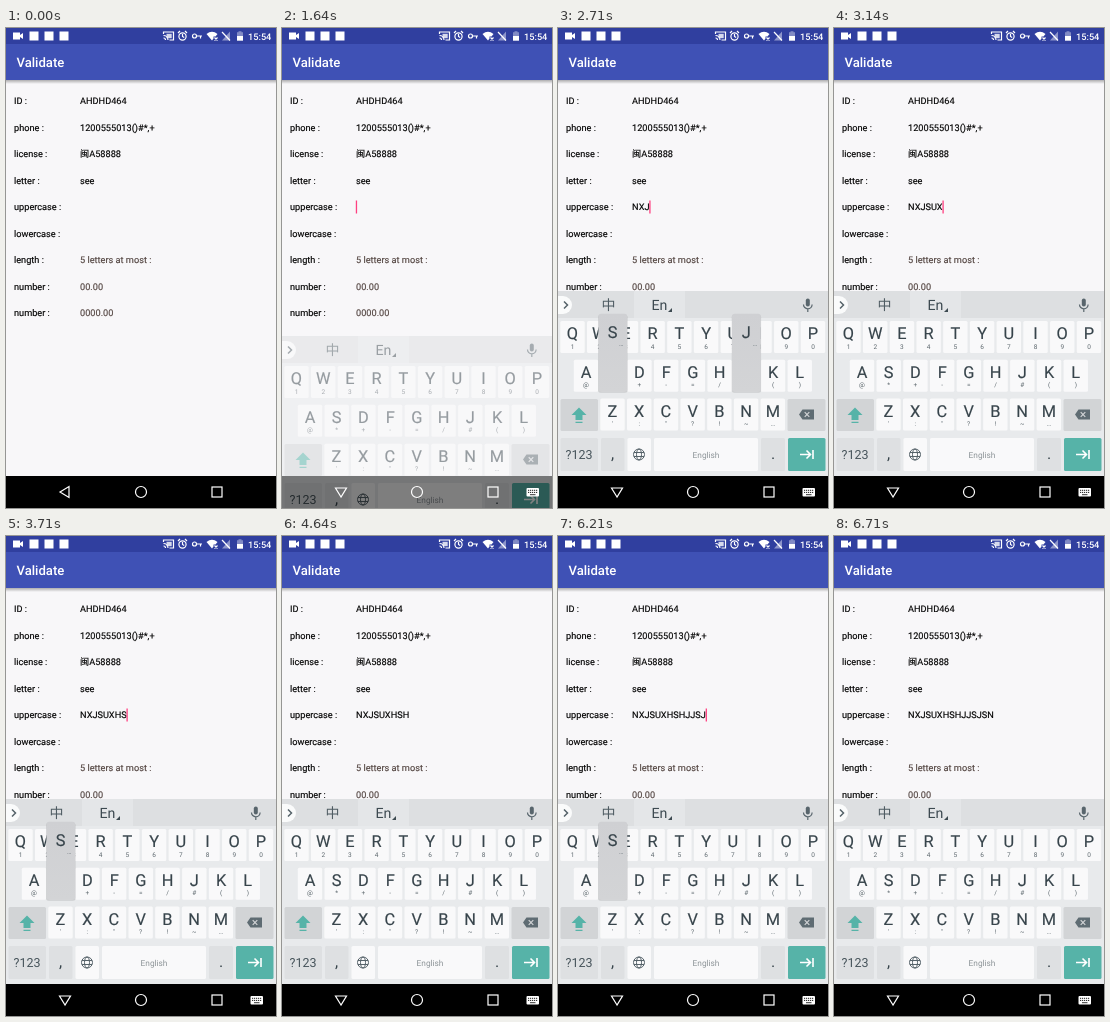
Write an HTML page that moves like this. It is 270 px wide and 480 px high and loops after 7 s.

```html
<!DOCTYPE html>
<html lang="en">
<head>
<meta charset="utf-8">
<title>Validate</title>
<style>
  html, body { margin: 0; width: 100%; height: 100%; overflow: hidden; background: #f8f7f9; }
  svg { display: block; width: 270px; height: 480px; font-family: Roboto, "Noto Sans CJK SC", "Noto Sans CJK JP", "Noto Sans CJK", sans-serif; text-rendering: geometricPrecision; }
  text { white-space: pre; }
  .form { font-size: 9.2px; fill: #000; stroke: #000; stroke-width: .15; }
  .form .hint { fill: #51433f; stroke: #51433f; }
  .line { fill: none; stroke: #fff; stroke-width: 1.2; }
  .key { fill: #f9f9fa; }
  .fn { fill: #dee0e2; }
  .dark { fill: #d2d4d6; }
  .cap { font-size: 16.4px; fill: #37444b; stroke: #37444b; stroke-width: .15; text-anchor: middle; }
  .sub { font-size: 6.5px; fill: #5d686e; text-anchor: middle; }
</style>
</head>
<body>
<svg viewBox="0 0 270 480">
  <defs>
    <linearGradient id="shade" x2="0" y2="1">
      <stop offset="0" stop-color="#000" stop-opacity=".3"/>
      <stop offset="1" stop-color="#000" stop-opacity="0"/>
    </linearGradient>
    <linearGradient id="pop" x2="0" y2="1">
      <stop offset="0" stop-color="#cfd0d3"/>
      <stop offset="1" stop-color="#d3d4d6"/>
    </linearGradient>
  </defs>

  <rect width="270" height="480" fill="#f8f7f9"/>
  <rect y="52" width="270" height="4" fill="url(#shade)"/>
  <rect width="270" height="52" fill="#3f51b5"/>
  <rect width="270" height="16" fill="#303f9f"/>
  <text x="10.5" y="39" font-size="13.1" font-weight="500" fill="#fff">Validate</text>

  <g id="status" fill="#fff">
    <path d="M7 4.500h7v2.500l3-2v6l-3-2v2.500h-7z"/>
    <rect x="23.500" y="3.500" width="9" height="9"/>
    <rect x="38.500" y="3.500" width="9" height="9"/>
    <rect x="53.500" y="3.500" width="9" height="9"/>
    <path class="line" d="M157.500 6V4h10v8h-4M157.500 7.500a4.500 4.500 0 0 1 4.500 4.500M157.500 10a2 2 0 0 1 2 2"/>
    <rect x="160.500" y="5.800" width="5.200" height="4.400" opacity=".8"/>
    <g class="line"><circle cx="176.500" cy="8.500" r="3.600"/><path d="M176.500 6v2.500l1.700 1M172 5l2-2M181 5l-2-2"/></g>
    <g class="line"><circle cx="188.500" cy="8" r="2"/><path d="M190.500 8h5.500M194.500 8v2.500"/></g>
    <path d="M200.500 6q5.500-4.500 11 0l-2 2.500h-2v2l-1.500 2z"/>
    <path class="line" d="M208.500 9.500l3 3m0-3l-3 3"/>
    <path d="M216 12.500l8-9v9z" opacity=".45"/>
    <path class="line" d="M216 4l8 8.500"/>
    <path d="M231 4.200h1.500v-1h3v1H237v3.800h-6z" opacity=".4"/>
    <path d="M231 8h6v4.700h-6z"/>
    <text x="242" y="11.800" font-size="9.2" font-weight="500">15:54</text>
  </g>

  <g id="form" class="form"></g>
  <rect id="cursor" y="172.500" width="1.300" height="13" fill="#ff4081"/>

  <rect y="448" width="270" height="32" fill="#000"/>
  <g id="keyboard">
    <rect y="263" width="270" height="185" fill="#e8eaec"/>
    <rect y="263" width="270" height="27" fill="#dddfe1"/>
    <rect x="76" y="263" width="51" height="27" fill="#e4e6e8"/>
    <path d="M0 268h5a9 9 0 0 1 0 18H0z" fill="#fafbfb"/>
    <path d="M6 273.500l3.500 3.500l-3.500 3.500" fill="none" stroke="#56636a" stroke-width="1.500"/>
    <text x="43.500" y="282" font-size="14" fill="#4f5c63">中</text>
    <text x="93.500" y="282" font-size="14.200" fill="#3d4a51">En</text>
    <path d="M114 280v4h-4z" fill="#3d4a51"/>
    <rect x="247.800" y="270.500" width="4" height="8" rx="2" fill="#58656c"/>
    <path d="M245.500 276.500a4.300 4.300 0 0 0 8.600 0M249.800 281v3" fill="none" stroke="#58656c" stroke-width="1.200"/>
    <g id="keys"></g>
    <path d="M21 379.500l7.500 7.500h-4v5h-7v-5h-4zM17.500 393.700h7v1.200h-7z" fill="#56b3a8"/>
    <path d="M244.500 381.500h11.500v10h-11.500l-3.500-5z" fill="#5f6c73"/>
    <path d="M246.700 384.200l4.600 4.600m0-4.600l-4.600 4.600" stroke="#d2d4d6" stroke-width="1.200"/>
    <g fill="none" stroke="#56636a">
      <circle cx="81" cy="426.500" r="5.500"/>
      <ellipse cx="81" cy="426.500" rx="2.500" ry="5.500"/>
      <path d="M76 424.500h10M76 428.500h10"/>
    </g>
    <path d="M242 426.500h10M248.500 422.500l4 4l-4 4M255 422v9" fill="none" stroke="#fff" stroke-width="1.600"/>
  </g>
  <g id="popups"></g>

  <g class="line">
    <path id="back" d="M54 464l9-5.500v11z"/>
    <circle cx="135" cy="464" r="5.500"/>
    <rect x="206" y="459" width="10" height="10"/>
  </g>
  <g id="imeIcon" fill="#fff">
    <rect x="244.500" y="460" width="12.500" height="8.500" rx="1"/>
    <path d="M246 462.300h9.500M246 464.400h9.500" stroke="#000" stroke-width=".9" stroke-dasharray="1.200 .8"/>
    <path d="M248 466.700h5.500" stroke="#000" stroke-width=".8"/>
  </g>
</svg>
<script>
const LOOP = 7000;
const $ = id => document.getElementById(id);

function add(parent, tag, attrs, text) {
  const el = document.createElementNS('http://www.w3.org/2000/svg', tag);
  for (const name in attrs) el.setAttribute(name, attrs[name]);
  if (text) el.textContent = text;
  return parent.appendChild(el);
}

// Form rows: label, value, is the value a hint
const rows = [
  ['ID :', 'AHDHD464'], ['phone :', '1200555013()#*,+'], ['license :', '闽A58888'],
  ['letter :', 'see'], ['uppercase :', ''], ['lowercase :', ''],
  ['length :', '5 letters at most :', true], ['number :', '00.00', true], ['number :', '0000.00', true]
];
const values = rows.map(([label, value, hint], i) => {
  const y = 76.1 + i * 26.5;
  add($('form'), 'text', { x: 8, y }, label);
  return add($('form'), 'text', { x: 74, y, class: hint ? 'hint' : '' }, value);
});
const field = values[4];

// Keyboard
const keys = $('keys');
const spots = {};
function keyBox(x, y, width, height, cls) {
  return add(keys, 'rect', { x, y, width, height, rx: 1.5, class: cls });
}
[
  ['QWERTYUIOP', '1234567890', 14.5],
  ['ASDFGHJKL', '@*+-=/#()', 28],
  ['ZXCVBNM', '\':"?!~…', 54.5]
].forEach(([letters, subs, x0], r) => {
  [...letters].forEach((ch, i) => {
    const x = x0 + i * 26.72, y = 293 + r * 38.8;
    spots[ch] = { x, y };
    keyBox(x - 12.2, y, 24.4, 32, 'key');
    add(keys, 'text', { x, y: y + 18, class: 'cap' }, ch);
    add(keys, 'text', { x, y: y + 27.5, class: 'sub' }, subs[i]);
  });
});
keyBox(2.5, 371, 37.5, 32, 'dark');
keyBox(229.5, 371, 38, 32, 'dark');
[[2.5, 37.5], [43, 23.5], [203, 24]].forEach(([x, w]) => keyBox(x, 410, w, 33, 'fn'));
[[69.5, 23.5], [96, 104]].forEach(([x, w]) => keyBox(x, 410, w, 33, 'key'));
keyBox(230, 410, 37.5, 33).setAttribute('fill', '#56b3a8');
const label = (x, y, size, fill, text) =>
  add(keys, 'text', { x, y, 'font-size': size, fill, 'text-anchor': 'middle' }, text);
label(21, 431, 12.5, '#46535a', '?123');
label(54.5, 431, 16, '#37444b', ',');
label(215, 431, 16, '#37444b', '.');
label(148, 429.5, 8.3, '#8d9498', 'English');

// Key presses: letter, press, commit, release
const presses = [
  ['N', 2070, 2140, 2290], ['X', 2290, 2360, 2500], ['J', 2570, 2640, 2790],
  ['S', 2710, 2790, 2860], ['U', 2860, 2930, 3010], ['X', 3010, 3070, 3140],
  ['H', 3360, 3430, 3570], ['S', 3570, 3640, 3790], ['H', 3790, 3860, 3930],
  ['J', 5570, 5640, 5790], ['J', 5790, 5860, 5930], ['S', 5930, 6000, 6070],
  ['J', 6070, 6140, 6210], ['S', 6210, 6290, 6360], ['N', 6360, 6430, 6500]
];
const popups = {};
for (const ch of new Set(presses.map(p => p[0]))) {
  const { x, y } = spots[ch];
  const g = popups[ch] = add($('popups'), 'g');
  add(g, 'rect', { x: x - 14.6, y: y - 45, width: 29.4, height: 78, rx: 2.5, fill: '#000', opacity: .12 });
  add(g, 'rect', { x: x - 14.3, y: y - 46, width: 28.8, height: 78, rx: 2.5, fill: 'url(#pop)' });
  add(g, 'text', { x, y: y - 21.5, class: 'cap' }, ch);
  add(g, 'text', { x: x + 8.5, y: y - 13.5, class: 'sub' }, '…');
}

// Spans in which the caret shows
const caretOn = [[1360, 1860], [2070, 4210], [4710, 5210], [5570, 6710]];

const ramp = (t, a, b) => Math.min(1, Math.max(0, (t - a) / (b - a)));
const smooth = p => p * p * (3 - 2 * p);
const show = (el, on) => el.setAttribute('visibility', on ? 'visible' : 'hidden');

function draw(t) {
  const drop = 47 * (1 - smooth(ramp(t, 1620, 1790)));
  const alpha = ramp(t, 1560, 1720);
  $('keyboard').setAttribute('transform', `translate(0 ${drop})`);
  $('keyboard').setAttribute('opacity', alpha);
  $('imeIcon').setAttribute('opacity', ramp(t, 1500, 1620));
  $('back').setAttribute('transform', `rotate(${-90 * smooth(ramp(t, 1480, 1620))} 59 464)`);

  const typed = presses.filter(p => t >= p[2]).map(p => p[0]).join('');
  if (field.textContent !== typed) field.textContent = typed;
  const width = typed ? field.getComputedTextLength() : 0;
  $('cursor').setAttribute('x', 73.8 + width);
  show($('cursor'), caretOn.some(([a, b]) => t >= a && t < b));

  for (const ch in popups)
    show(popups[ch], presses.some(p => p[0] === ch && t >= p[1] && t < p[3]));
}

function tick() {
  draw(performance.now() % LOOP);
  requestAnimationFrame(tick);
}
tick();
</script>
</body>
</html>
```
